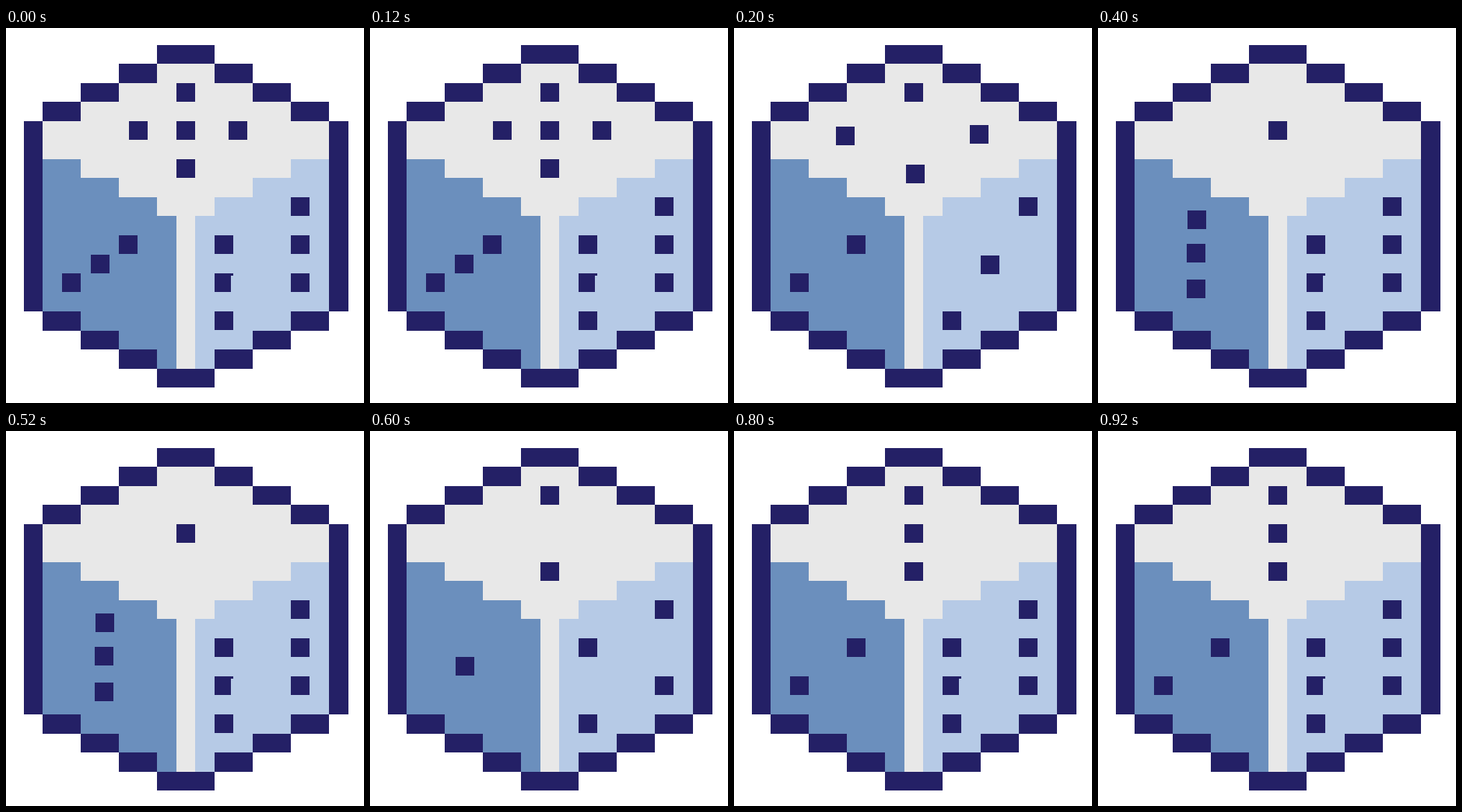
An HTML page for the animation above (1 s loop, 460 px wide and 483 px high).

```html
<!DOCTYPE html>
<html lang="en">
<head>
<meta charset="utf-8">
<title>Pixel die</title>
<style>
  html, body { margin: 0; width: 100%; height: 100%; overflow: hidden; background: #fff; }
  svg { display: block; width: 100%; height: 100%; }
</style>
</head>
<body>
<svg viewBox="0 0 460 483" shape-rendering="crispEdges">
  <g id="die"></g>
  <g id="pips"></g>
</svg>
<script>
const INK = '#242066', TOP = '#e8e8e8', LEFT = '#6b8fbd', RIGHT = '#b6cae6';
const LOOP = 1000, STEP = 200, CELL = 24.53, PIP = 24;
const gx = col => Math.round(22.6 + col * CELL);
const gy = row => Math.round(21.7 + row * CELL);

const die = document.getElementById('die');
const pips = document.getElementById('pips');

function rect(parent, x, y, w, h, fill) {
  const el = document.createElementNS('http://www.w3.org/2000/svg', 'rect');
  for (const [k, v] of Object.entries({ x, y, width: w, height: h, fill })) el.setAttribute(k, v);
  parent.appendChild(el);
}

// Fills grid cells from (c0, r0) up to (c1, r1).
function block(c0, r0, c1, r1, fill) {
  rect(die, gx(c0), gy(r0), gx(c1) - gx(c0), gy(r1) - gy(r0), fill);
}

// Draws a block and its mirror image about the middle of the die.
function pair(c0, r0, c1, r1, fill, mirrorFill = fill) {
  block(c0, r0, c1, r1, fill);
  block(17 - c1, r0, 17 - c0, r1, mirrorFill);
}

function drawDie() {
  for (let i = 0; i < 3; i++) block(7 - 2 * i, i + 1, 10 + 2 * i, i + 2, TOP);
  block(1, 4, 16, 9, TOP);
  block(8, 9, 9, 17, TOP);
  for (let i = 0; i < 3; i++) {
    pair(1, 6 + i, 3 + 2 * i, 7 + i, LEFT, RIGHT);
    pair(3 + 2 * i, 14 + i, 8, 15 + i, LEFT, RIGHT);
  }
  pair(1, 9, 8, 14, LEFT, RIGHT);

  block(7, 0, 10, 1, INK);
  block(7, 17, 10, 18, INK);
  for (let i = 0; i < 3; i++) {
    pair(5 - 2 * i, 1 + i, 7 - 2 * i, 2 + i, INK);
    pair(1 + 2 * i, 14 + i, 3 + 2 * i, 15 + i, INK);
  }
  pair(0, 4, 1, 14, INK);
}

const high = [219, 71], mid = [219, 120], low = [219, 169];
const leftPair = [[145, 267], [72, 316]];
const ends = [[366, 218], [268, 365]];
const four = [...ends, [268, 267], [366, 316]];
const six = [...four, [366, 267], [268, 316, true]];

const rolls = [
  [high, mid, low, [158, 120], [286, 120], ...leftPair, [109, 292], ...six],
  [high, [131, 127], [303, 125], [221, 176], ...leftPair, ...ends, [317, 293]],
  [mid, [115, 235], [114, 278], [114, 324], ...six],
  [high, low, [110, 291], ...four],
  [high, mid, low, ...leftPair, ...six]
];

function drawPip([x, y, notched]) {
  rect(pips, x, y, notched ? 21 : PIP, PIP, INK);
  if (notched) rect(pips, x, y, PIP, 3, INK);
}

let shown = -1;
function render(time) {
  const roll = Math.floor((time % LOOP) / STEP);
  if (roll === shown) return;
  shown = roll;
  pips.replaceChildren();
  rolls[roll].forEach(drawPip);
}

drawDie();
render(0);
const start = performance.now();
function tick() {
  render(performance.now() - start);
  requestAnimationFrame(tick);
}
requestAnimationFrame(tick);
</script>
</body>
</html>
```
